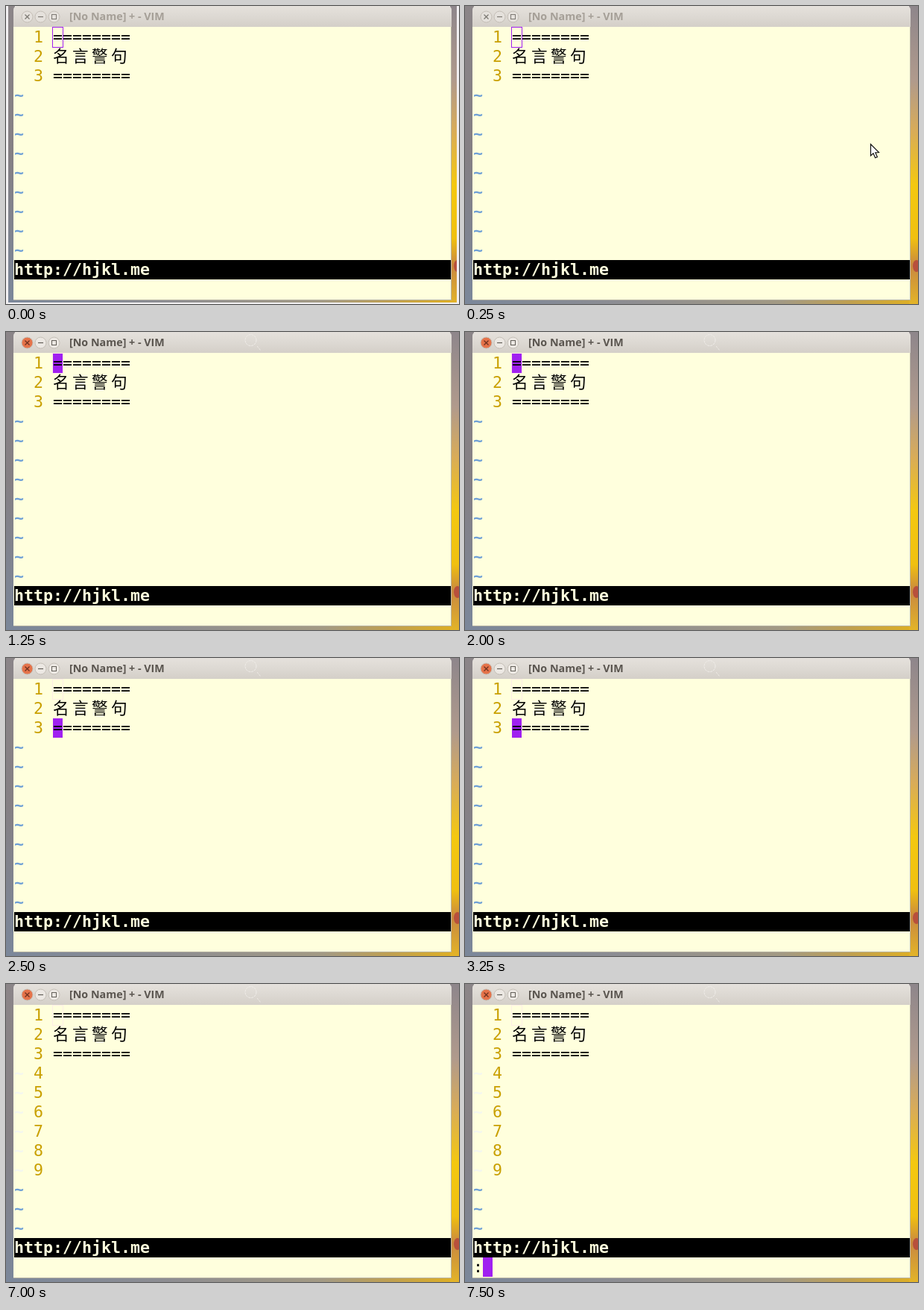
An HTML page with a canvas for the animation above (8000 ms loop, 608 by 400 pixels).

```html
<!DOCTYPE html>
<html lang="zh-CN">
<head>
<meta charset="utf-8">
<style>
  html, body { margin: 0; width: 608px; height: 400px; overflow: hidden; }
  canvas { display: block; }
</style>
</head>
<body>
<canvas id="stage" width="608" height="400"></canvas>
<script>
const c = document.getElementById('stage').getContext('2d');
const LOOP = 8000, CELL = 13, ROW = 26, LEFT = 11, TOP = 29;
const PAPER = '#ffffdd', PURPLE = '#a020f0', GOLD = '#c9a000', BLUE = '#6fa0d6';
const MONO = '21.6px "DejaVu Sans Mono", monospace';
const CJK = '21.6px "Noto Sans CJK SC", "Noto Sans CJK JP", "Noto Sans CJK", sans-serif';

// Text cursor: [start ms, column, row]; null hides it.
const cursorSteps = [
  [1250, 4, 0], [1750, null], [2000, 4, 0], [2500, 4, 2], [2750, null],
  [3250, 4, 2], [6000, 4, 3], [7000, null], [7250, 4, 8], [7500, 1, 13]
];
// Mouse arrow: [start ms, x, y]
const mouseSteps = [[250, 544, 185], [500, 372, 54], [750, 337, 16], [1000, null]];

const at = (steps, t) => steps.filter(s => s[0] <= t).pop();

function rect(x, y, w, h, fill) {
  c.fillStyle = fill;
  c.fillRect(x, y, w, h);
}

function gradient(x0, y0, x1, y1, ...stops) {
  const g = c.createLinearGradient(x0, y0, x1, y1);
  stops.forEach(([p, color]) => g.addColorStop(p, color));
  return g;
}

function text(s, x, y, color, font) {
  c.font = font;
  c.fillStyle = color;
  c.fillText(s, x, y);
}

function put(s, col, row, color, bold) {
  text(s, LEFT + col * CELL, TOP + row * ROW + 20, color, (bold ? 'bold ' : '') + MONO);
}

function line(points, color, width) {
  c.beginPath();
  points.forEach(([x, y]) => c.lineTo(x, y));
  c.strokeStyle = color;
  c.lineWidth = width;
  c.stroke();
}

function desktop(t) {
  rect(0, 0, 12, 400, gradient(0, 0, 0, 400, [0, '#8b8588'], [.5, '#858084'], [1, '#7b879a']));
  rect(0, 394, 608, 6, gradient(0, 0, 608, 0,
    [0, '#7b879a'], [.35, '#8d8d92'], [.7, '#a39a84'], [.85, '#c0a050'], [1, '#e0b020']));
  rect(596, 0, 12, 400, gradient(0, 0, 0, 400,
    [0, '#8e868b'], [.25, '#b09a8c'], [.42, '#d9ac58'], [.6, '#f4c810'],
    [.78, '#f0c010'], [.87, '#c88840'], [1, '#e3b428']));
  c.fillStyle = '#b8503c';
  c.beginPath();
  c.ellipse(606, 349, 5, 8, 0, 0, 7);
  c.fill();
  if (t < 250) {
    rect(0, 0, 3, 400, '#f1eff1');
    rect(605, 0, 3, 400, '#f1eff1');
    rect(0, 398, 608, 2, '#f1eff1');
  }
}

function button(x, fill, ink, kind) {
  c.beginPath();
  c.arc(x, 14.5, 7.5, 0, 7);
  c.fillStyle = fill;
  c.fill();
  c.strokeStyle = '#c4beb6';
  c.lineWidth = 1;
  c.stroke();
  if (kind === 'close') {
    line([[x - 3, 11.5], [x + 3, 17.5]], ink, 1.3);
    line([[x + 3, 11.5], [x - 3, 17.5]], ink, 1.3);
  } else if (kind === 'min') {
    line([[x - 3.5, 14.5], [x + 3.5, 14.5]], ink, 1.2);
  } else {
    c.strokeStyle = ink;
    c.strokeRect(x - 3, 11.5, 6, 6);
  }
}

function titleBar(focused) {
  c.fillStyle = gradient(0, 0, 0, 28, [0, '#e5e1dc'], [.5, '#ddd9d3'], [1, '#d4cfc8']);
  c.beginPath();
  c.roundRect(10, 0, 588, 29, [5, 5, 0, 0]);
  c.fill();
  const ink = focused ? '#625e58' : '#7c7872';
  const fill = focused ? '#ece8e3' : '#e5e1dc';
  button(28.5, focused ? '#e5734a' : fill, focused ? '#6e3020' : ink, 'close');
  button(46.5, fill, ink, 'min');
  button(64.5, fill, ink, 'max');
  text('[No Name] + - VIM', 85, 19, focused ? '#5a554f' : '#a59f97',
    'bold 14.3px "Open Sans", sans-serif');
}

function arrow(x, y) {
  c.beginPath();
  [[.5, .5], [.5, 16], [4, 12.8], [6.6, 18.8], [9.4, 17.6], [6.8, 11.8], [11.5, 11.5]]
    .forEach(([dx, dy]) => c.lineTo(x + dx, y + dy));
  c.closePath();
  c.fillStyle = '#fff';
  c.fill();
  c.strokeStyle = '#111';
  c.lineWidth = 1.2;
  c.stroke();
}

function fist() {
  c.beginPath();
  c.roundRect(321, 4, 15, 15, 6);
  c.fillStyle = '#fff';
  c.fill();
  c.strokeStyle = '#222';
  c.lineWidth = 1.2;
  c.stroke();
  for (const x of [325, 328.5, 332]) line([[x, 5], [x, 10]], '#222', 1);
}

// Faint trails left behind by the grab pointer.
function trail() {
  c.setLineDash([3, 1]);
  c.beginPath();
  c.arc(328.5, 11, 7.5, 0, 7);
  c.strokeStyle = '#f0ede9';
  c.lineWidth = 1;
  c.stroke();
  line([[337, 19], [342, 25]], '#eeebe6', 1);
  c.setLineDash([]);
}

function outline(color) {
  c.strokeStyle = color;
  c.lineWidth = 1;
  c.strokeRect(62.5, 28.5, 14, 27);
}

function editor(t) {
  rect(10, 28, 588, 367, '#b9b5a6');
  rect(10, 28, 587, 366, PAPER);
  if (t >= 1250) outline('#fdeee6');

  const step = at(cursorSteps, t);
  if (step && step[1] !== null) {
    rect(LEFT + step[1] * CELL, TOP + step[2] * ROW, CELL, ROW, PURPLE);
  }

  const lines = t < 6000 ? 3 : t < 7000 ? 4 : 9;
  for (let row = 0; row < 12; row++) {
    if (row < lines) put(row + 1, 2, row, GOLD);
    if (row > 2) put('~', 0, row, row < lines ? '#f4f6ee' : BLUE, true);
  }
  put('========', 4, 0, '#000');
  [...'名言警句'].forEach((s, i) => text(s, 63 + i * ROW, 75, '#000', CJK));
  put('========', 4, 2, '#000');

  rect(LEFT, 341, 586, ROW, '#000');
  put('http://hjkl.me', 0, 12, PAPER, true);
  if (t >= 6000 && t < 6750) put('-- INSERT --', 0, 13, '#000', true);
  if (t >= 7500) put(':', 0, 13, '#000');
  if (t < 1250) outline(PURPLE);
}

function draw(now) {
  const t = now % LOOP;
  desktop(t);
  titleBar(t >= 1000);
  editor(t);
  const mouse = at(mouseSteps, t);
  if (mouse && mouse[1] !== null) arrow(mouse[1], mouse[2]);
  if (t >= 1250) trail();
  else if (t >= 1000) fist();
}

const start = performance.now();
function tick() {
  draw(performance.now() - start);
  requestAnimationFrame(tick);
}
tick();
</script>
</body>
</html>
```
